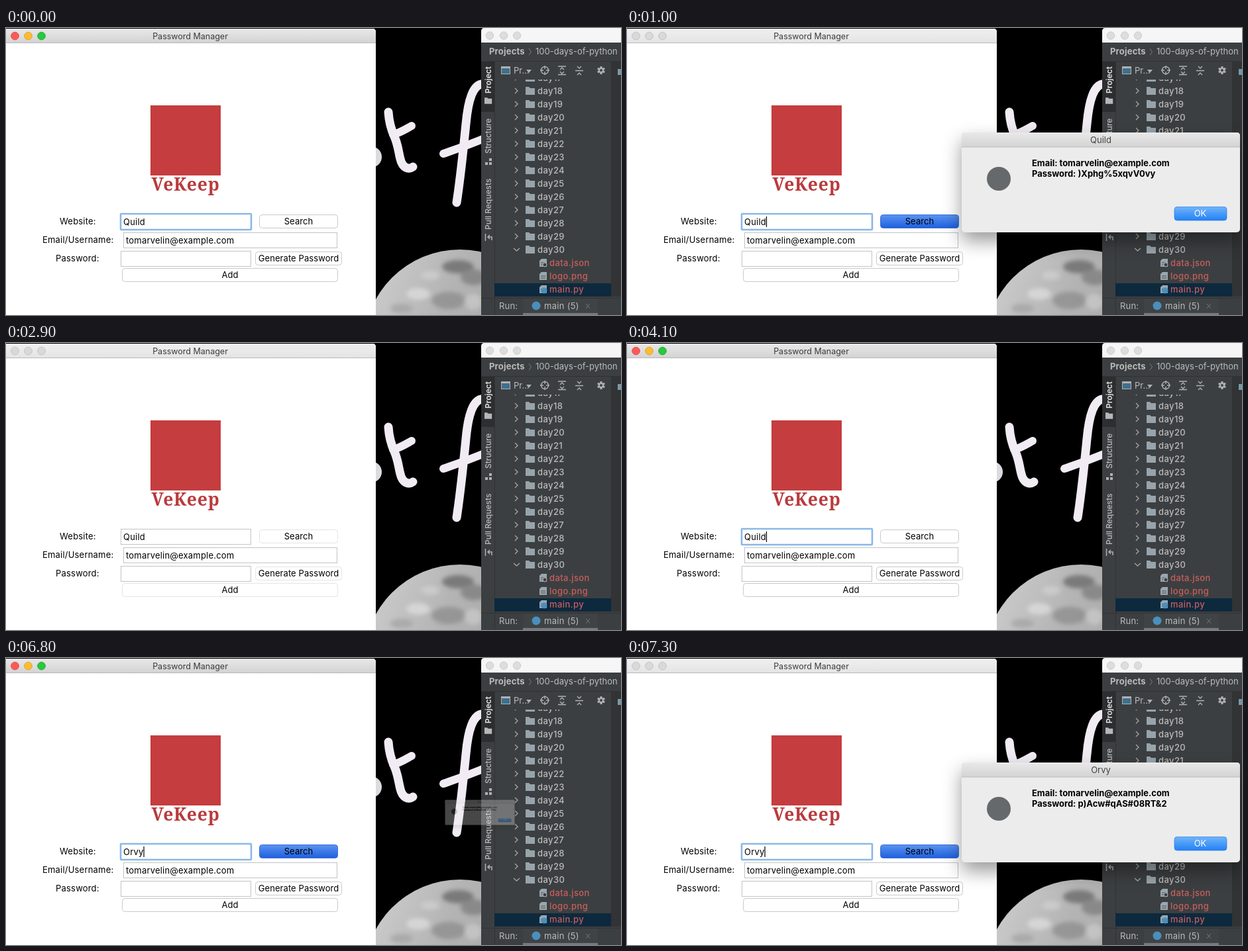
Recreate the animation shown at these times as an HTML page. Size 928 by 434 pixels, loop 7.4 s.

```html
<!DOCTYPE html>
<html lang="en">
<head>
<meta charset="utf-8">
<title>Password Manager</title>
<style>
  html, body { margin: 0; width: 100%; height: 100%; overflow: hidden; background: #000; }
  svg { display: block; width: 928px; height: 434px; }
  text { font-family: Inter, "Open Sans", sans-serif; font-size: 13px; white-space: pre; }
  .tk { letter-spacing: .2px; }
  .tree { letter-spacing: .4px; font-weight: 500; }
  .brand { font: bold 26.5px "Noto Serif", serif; letter-spacing: .8px; }
  #dialog { filter: drop-shadow(0 13px 14px rgba(0, 0, 0, .4)); }
</style>
</head>
<body>
<svg id="stage" viewBox="0 0 928 434" xmlns="http://www.w3.org/2000/svg">
  <defs>
    <linearGradient id="bar" x2="0" y2="1"><stop stop-color="#e9e9e9"/><stop offset="1" stop-color="#d3d3d3"/></linearGradient>
    <linearGradient id="idleBar" x2="0" y2="1"><stop stop-color="#f0f0f0"/><stop offset="1" stop-color="#e4e4e4"/></linearGradient>
    <linearGradient id="pressed" x2="0" y2="1"><stop stop-color="#5a94f2"/><stop offset="1" stop-color="#1f5fdd"/></linearGradient>
    <linearGradient id="ok" x2="0" y2="1"><stop stop-color="#6fb5fb"/><stop offset="1" stop-color="#2380f5"/></linearGradient>
    <linearGradient id="moon" x2="1" y2=".4"><stop stop-color="#d2d2d2"/><stop offset=".45" stop-color="#b4b4b4"/><stop offset="1" stop-color="#a2a2a2"/></linearGradient>
    <filter id="soft"><feGaussianBlur stdDeviation="3"/></filter>
    <clipPath id="treeClip"><rect x="737" y="78" width="176" height="328"/></clipPath>
  </defs>
  <g id="desktop"></g>
  <g id="ide"></g>
  <g id="manager"></g>
  <g id="dialog"></g>
</svg>
<script>
const $ = id => document.getElementById(id);
const LOOP = 7400, STEP = 100;
const MAIL = 'tomarvelin@example.com';
const SITES = [
  { name: 'Quild', pass: ')Xphg%5xqvV0vy', open: 600 },
  { name: 'Orvy', pass: 'p)Acw#qAS#08RT&2', open: 6800 }
];
const CLOSE = 2600, REFOCUS = 3700;

const text = (x, y, s, attrs = '') => `<text x="${x}" y="${y}" ${attrs}>${s}</text>`;
const mid = (x, y, s, attrs = '') => text(x, y, s, `text-anchor="middle" ${attrs}`);
const rect = (x, y, w, h, fill, attrs = '') =>
  `<rect x="${x}" y="${y}" width="${w}" height="${h}" fill="${fill}" ${attrs}/>`;
const disc = (x, y, r, fill, attrs = '') => `<circle cx="${x}" cy="${y}" r="${r}" fill="${fill}" ${attrs}/>`;
const line = (d, color, w = 1, attrs = '') =>
  `<path d="${d}" fill="none" stroke="${color}" stroke-width="${w}" ${attrs}/>`;
const shape = (d, fill) => `<path d="${d}" fill="${fill}"/>`;
const blot = (x, y, rx, ry, fill) => `<ellipse cx="${x}" cy="${y}" rx="${rx}" ry="${ry}" fill="${fill}"/>`;
const field = (x, y, w) => rect(x + .5, y + .5, w - 1, 23, '#fff', 'stroke="#c3c3c3"');
const button = (x, y, w, label, id = '') =>
  rect(x + .5, y + .5, w - 1, 20, '#fff', `class="button" rx="4" ${id}`) +
  mid(x + w / 2, y + 15, label, 'letter-spacing=".08"');
const folder = (x, y, c, k = 1) =>
  `<path transform="translate(${x} ${y}) scale(${k})" d="M0-6h5l2 2h7v10h-14z" fill="${c}"/>`;

function drawDesktop() {
  const stroke = (d, w) => line(d, '#f1ebf4', w, 'stroke-linecap="round" stroke-linejoin="round"');
  $('desktop').innerHTML = rect(0, 0, 928, 434, '#000') +
    disc(551, 195, 16, '#dedbe0') +
    stroke('M577 127C578 143 581 153 586 164C592 178 592 187 595 198C598 211 607 215 614 210', 13) +
    stroke('M584 161C594 159 603 153 612 148', 12) +
    stroke('M722 85C704 82 697 112 694 145C690 185 686 225 680 264', 13) +
    stroke('M660 190C677 184 698 177 724 166', 12) +
    disc(685, 480, 145, 'url(#moon)') +
    '<g filter="url(#soft)" opacity=".8">' +
    blot(682, 361, 24, 10, '#6c6c6c') + blot(706, 377, 20, 12, '#808080') +
    blot(668, 412, 26, 13, '#8f8f8f') + blot(622, 402, 18, 9, '#dcdcdc') +
    blot(640, 374, 14, 7, '#cfcfcf') + blot(705, 414, 13, 12, '#c8c8c8') +
    blot(597, 424, 17, 7, '#a5a5a5') + '</g>';
}

function drawIde() {
  const gray = '#afb1b3', label = '#bbbbbb';
  const side = (y, s, fill, w = 500) =>
    `<text transform="translate(731.5 ${y}) rotate(-90)" fill="${fill}" style="font-size:12px;font-weight:${w}">${s}</text>`;

  let rows = '';
  for (let day = 17; day <= 30; day++) {
    const y = 95 + (day - 18) * 20, open = day === 30;
    rows += line(open ? `M766 ${y - 2}l4.5 4 4.5-4` : `M768 ${y - 4}l4 4-4 4`, '#a0a4a6', 1.4) +
      folder(784, y, '#97a4ac') + text(802, y + 5, 'day' + day, `class="tree" fill="${label}"`);
  }
  ['data.json', 'logo.png', 'main.py'].forEach((name, i) => {
    const y = 355 + i * 20;
    if (i === 2) rows += rect(737, 386, 176, 20, '#0d293e');
    rows += shape(`M808 ${y - 6}h8v12h-11v-9z`, '#9aa7b0') + line(`M807 ${y}h7m-7 3h7`, '#4b5052');
    if (i === 0) rows += disc(813, y + 3, 3, '#3c3f41', 'stroke="#b4bbc0"');
    if (i === 2) rows += disc(812, y + 2, 4.5, '#4b8fbd');
    rows += text(820, y + 5, name, 'class="tree" fill="#c75f5d"');
  });

  let teeth = '';
  for (let a = 0; a < 360; a += 60)
    teeth += rect(896.5, 58, 3, 4, gray, `transform="rotate(${a} 898 64)"`);

  $('ide').innerHTML =
    shape('M717 434V5q0-5 5-5H928V434z', '#3c3f41') +
    shape('M717 22V5q0-5 5-5H928V22z', '#f6f6f6') +
    [730, 751, 771].map(x => disc(x, 11.5, 5.7, '#dddddd', 'stroke="#cbcbcb"')).join('') +
    text(729, 40, 'Projects', `fill="${label}" font-weight="700" letter-spacing=".2"`) +
    line('M789 31l3.5 5-3.5 5', '#777a7c') +
    text(799, 40, '100-days-of-python', `fill="${label}"`) +
    line('M717 50.5H928M737.5 50V434', '#323232') +
    rect(717, 51, 20, 76, '#2c2e2f') +
    side(99, 'Project', '#e4e4e4', 600) + folder(722, 110, '#b4b8ba', .8) +
    side(190, 'Structure', label) +
    rect(723, 203, 4, 4, gray) + rect(729, 203, 4, 4, gray) + rect(729, 197, 4, 4, gray) +
    side(305, 'Pull Requests', label) +
    line('M723.5 311v11M733 321v-5h-6m3-3l-3 3 3 3', gray, 1.5) +
    rect(747.5, 58.5, 13, 11, '#3f708e', `stroke="${gray}"`) + rect(748, 58, 13, 3, gray) +
    text(766, 69, 'Pr...', `fill="${label}"`) + shape('M785 63h8l-4 5z', gray) +
    disc(813, 64, 5.5, 'none', `stroke="${gray}" stroke-width="1.4"`) +
    line('M813 57v5m0 4v5M806 64h5m4 0h5', gray, 1.4) +
    line('M833 58h12M833 70.5h12M836 63l3-3 3 3M836 66l3 3 3-3', gray, 1.4) +
    line('M859 64.5h12M862 58l3 3 3-3M862 71l3-3 3 3', gray, 1.4) +
    teeth + disc(898, 64, 3.2, 'none', `stroke="${gray}" stroke-width="2.2"`) +
    rect(914, 51, 14, 355, '#313335') + rect(923, 62, 5, 9, '#7798a9') +
    `<g clip-path="url(#treeClip)">${rows}</g>` +
    line('M913.5 51V406M717 408.5H928', '#323232') +
    rect(780, 409, 113, 25, '#3f4345') + rect(780, 431, 113, 3, '#747a80') +
    text(744, 425, 'Run:', `fill="${label}" letter-spacing=".2"`) +
    disc(800, 420, 6.5, '#4b8fbd') +
    text(812, 425, 'main (5)', `fill="${label}" letter-spacing=".3"`) +
    line('M875 417l6 7m0-7l-6 7', '#727678');
}

function drawManager() {
  $('manager').innerHTML =
    shape('M0 1H553q5 0 5 5V434H0z', '#fff') +
    '<path id="titleBar" d="M0 1H553q5 0 5 5V22H0z"/>' +
    line('M0 22.5H558', '#b9b9b9') +
    [13.5, 33.5, 53.5].map(x => disc(x, 12, 5.8, '#ddd', 'class="light"')).join('') +
    mid(278, 17, 'Password Manager', 'fill="#3c3c3c" style="font-size:12.5px"') +
    rect(218, 117, 106, 106, '#c53d3f') +
    mid(271, 246, 'VeKeep', 'class="brand" fill="#b93a3c"') +
    text(81, 297, 'Website:', 'class="tk"') +
    text(55, 325, 'Email/Username:', 'class="tk"') +
    text(75, 353, 'Password:', 'class="tk"') +
    field(173, 281, 197) +
    rect(173, 281, 197, 24, 'none', 'id="ring" stroke="#8ab8e6" stroke-width="2.6" rx="1"') +
    text(177, 298, '', 'class="tk" id="site"') + rect(0, 285, 1.2, 16, '#000', 'id="caret"') +
    field(177, 309, 323) + text(181, 326, MAIL, 'class="tk"') +
    field(173, 337, 197) +
    button(382, 282, 119, 'Search', 'id="search"') +
    button(376, 338, 131, 'Generate Password') +
    button(175, 363, 326, 'Add');
}

function drawDialog() {
  const bold = 'font-weight="700" style="font-size:12.95px"';
  $('dialog').innerHTML =
    rect(505, 158, 420, 151, '#ececec', 'rx="5"') +
    shape('M505 180V163q0-5 5-5H920q5 0 5 5V180z', 'url(#bar)') +
    line('M505 180H925', '#bcbcbc') +
    mid(715, 174, '', 'id="dialogTitle" fill="#444"') +
    disc(561, 228, 18, '#65696b') +
    text(611, 209, 'Email: ' + MAIL, bold) +
    text(611, 225, '', `id="dialogPass" ${bold}`) +
    rect(826, 270.5, 79, 20.5, 'url(#ok)', 'rx="4" stroke="#2d7ce0" stroke-width=".7"') +
    mid(865, 285, 'OK', 'fill="#fff"');
}

// The website field: first name erased, second one typed.
function typed(t) {
  const [a, b] = SITES.map(s => s.name);
  if (t < 4300) return a;
  if (t < 4900) return a.slice(0, Math.max(0, 4 - (t - 4300) / 100));
  return b.slice(0, [4900, 5200, 5600, 5900].filter(k => t >= k).length);
}

// Pops from a quarter of its size, overshoots, then settles.
function pop(age) {
  if (age < 100) return [.25, .3];
  if (age < 200) return [1.15, .68];
  return [1, 1];
}

function render(now) {
  const t = Math.floor(now % LOOP / STEP) * STEP;
  const site = t < CLOSE ? SITES[0] : SITES[1];
  const age = t - site.open;
  const shown = age >= 0;
  const pressed = age >= -100;
  const active = age < 100 && (t < CLOSE || t >= REFOCUS);
  const focus = t < CLOSE || t >= REFOCUS;
  const typing = t >= 4300 && t < 6000;
  const blink = (t + 700) % 900 < 600 && t > 0;

  $('titleBar').setAttribute('fill', active ? 'url(#bar)' : 'url(#idleBar)');
  document.querySelectorAll('.light').forEach((c, i) => {
    c.setAttribute('fill', active ? ['#fc5b57', '#fdbc2e', '#28c840'][i] : '#d9d9d9');
    c.setAttribute('stroke', active ? ['#df4945', '#dea032', '#1aab2c'][i] : '#c2c2c2');
  });
  document.querySelectorAll('.button').forEach(b =>
    b.setAttribute('stroke', active || shown ? '#c9c9c9' : '#e4e4e4'));
  $('ring').style.display = focus ? '' : 'none';
  $('search').setAttribute('fill', pressed ? 'url(#pressed)' : '#fff');
  if (pressed) $('search').setAttribute('stroke', '#3a70d6');

  $('site').textContent = typed(t);
  $('caret').setAttribute('x', 177 + $('site').getComputedTextLength());
  $('caret').style.display = focus && (pressed || typing || blink) ? '' : 'none';

  const dialog = $('dialog');
  dialog.style.display = shown ? '' : 'none';
  if (shown) {
    const [scale, alpha] = pop(age);
    dialog.setAttribute('transform', `translate(715 233.5) scale(${scale}) translate(-715 -233.5)`);
    dialog.style.opacity = alpha;
    $('dialogTitle').textContent = site.name;
    $('dialogPass').textContent = 'Password: ' + site.pass.replace('&', '\u0026');
  }
}

drawDesktop();
drawIde();
drawManager();
drawDialog();

let start;
function tick(now) {
  start ??= now;
  render(now - start);
  requestAnimationFrame(tick);
}
render(0);
requestAnimationFrame(tick);
</script>
</body>
</html>
```
